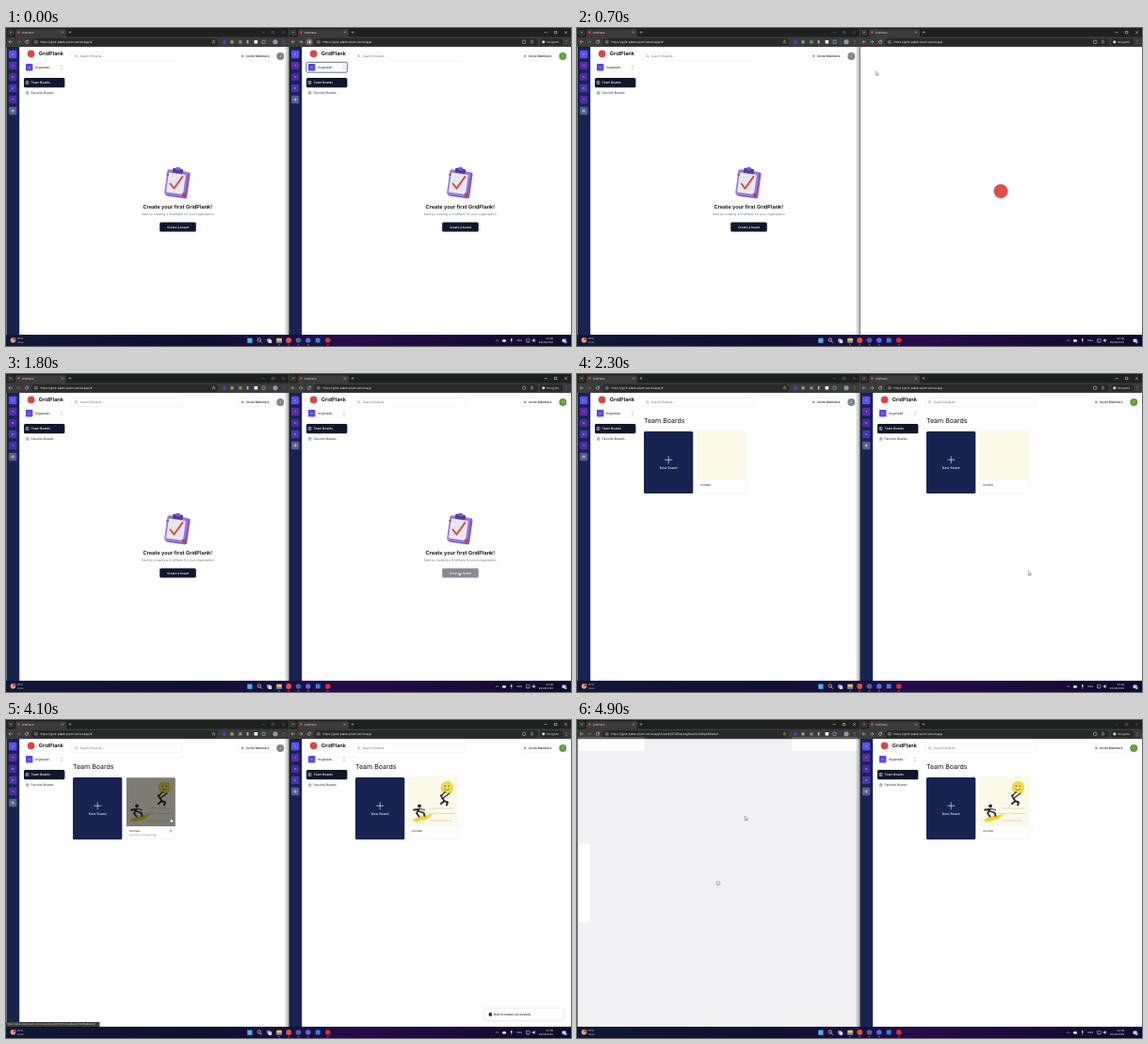
Recreate the animation shown at these times as an HTML page. Size 600 by 338 pixels, loop 5000 ms.

```html
<!DOCTYPE html>
<html lang="en">
<head>
<meta charset="utf-8">
<title>GridPlank</title>
<style>
html, body { margin: 0; height: 100%; overflow: hidden; background: #fff; }
svg { display: block; width: 100vw; height: 100vh; }
text { font-family: Inter, sans-serif; text-rendering: geometricPrecision; white-space: pre; }
</style>
</head>
<body>
<svg id="stage" viewBox="0 0 600 338" preserveAspectRatio="none"></svg>
<script>
const LOOP = 5000, STEP = 100;
const NAME = 'GridPlank', HOST = 'https://grid-plank-plum.vercel.app';
const BOARD_URL = HOST + '/board/j57451dvkxg9exp5c5d9pk86wdyf';
const NAVY = '#172350', INK = '#0f172a', GREY = '#71717a', LINE = '#e4e4e7';

const rect = (x, y, w, h, fill, r = 0, more = '') =>
  `<rect x="${x}" y="${y}" width="${w}" height="${h}" rx="${r}" fill="${fill}" ${more}/>`;
const circle = (x, y, r, fill, more = '') =>
  `<circle cx="${x}" cy="${y}" r="${r}" fill="${fill}" ${more}/>`;
const path = (d, stroke, w = .5, fill = 'none') =>
  `<path d="${d}" stroke="${stroke}" stroke-width="${w}" fill="${fill}" stroke-linecap="round" stroke-linejoin="round"/>`;
// y is the vertical middle of the line
const text = (x, y, size, str, fill = INK, weight = 400, anchor = 'start') =>
  `<text x="${x}" y="${y + size * .36}" font-size="${size}" fill="${fill}" font-weight="${weight}" text-anchor="${anchor}">${str}</text>`;
const group = (id, body, more = '') => `<g id="${id}" ${more}>${body}</g>`;
const border = (color, w = .35) => `stroke="${color}" stroke-width="${w}"`;
const plus = (x, y, r, color, w) => path(`M${x - r} ${y}h${2 * r}M${x} ${y - r}v${2 * r}`, color, w);
const star = (x, y, r, color) => {
  let d = '';
  for (let i = 0; i < 10; i++) {
    const a = i * Math.PI / 5, k = i % 2 ? r * .45 : r;
    d += (i ? 'L' : 'M') + (x + k * Math.sin(a)) + ' ' + (y - k * Math.cos(a));
  }
  return path(d + 'Z', color, .35);
};

function browserBar(id, right) {
  const c = '#d0d0d0';
  let s = rect(0, 0, 300, 11, '#1f2020') + rect(1.5, 1.5, 7, 6.5, '#343535', 1.5) +
    path('M4 4.2l1 1l1-1', c, .5) +
    `<path d="M8.5 10Q10 10 10 8V3Q10 1.2 12 1.2H62Q64 1.2 64 3V8Q64 10 65.5 10Z" fill="#3b3b3b"/>` +
    circle(13.3, 4.6, 1.3, '#e0433f') + text(16.7, 4.7, 2.8, NAME, '#e2e2e2') +
    path('M59 3.7l1.8 1.8m0-1.8l-1.8 1.8', c, .4) + plus(68, 4.5, 1.2, c, .4) +
    group(id + 'Controls', path('M272 4.7h2.2M282.7 3.6h2.2v2.2h-2.2zM293.4 3.6l2.2 2.2m0-2.2l-2.2 2.2', '#fff', .45)) +
    rect(0, 9.5, 300, 10.6, '#3b3b3b');
  if (right) s += group('reloadHover', circle(22, 14.8, 3.6, '#676767'));
  s += path('M6.6 14.8h-3.4m1.4-1.4l-1.4 1.4l1.4 1.4', c) +
    path('M11.4 14.8h3.4m-1.4-1.4l1.4 1.4l-1.4 1.4', right ? c : '#7b7b7b') +
    path('M23.4 14a1.6 1.6 0 1 0 .1 1.4M23.5 13v1.2h-1.2', c) +
    rect(27, 11, right ? 238 : 198, 7.7, '#282828', 3.8) + circle(31.8, 14.8, 2.6, '#3d3d3d') +
    path('M30.6 14.1h2.4M30.6 15.6h2.4', c, .4) +
    group(id + 'Url', text(36.5, 14.9, 3.2, right ? HOST : HOST + '/#', '#e8e8e8')) +
    star(right ? 258.5 : 220.5, 14.8, 1.8, c);
  if (right) s += rect(248.6, 13.2, 3.2, 3.2, 'none', .5, border(c, .5)) +
    rect(267, 11.2, 24.5, 7.3, '#282828', 3.6) + circle(270.8, 14.8, 1.6, c) +
    text(274, 14.9, 3, 'Incognito', '#e8e8e8');
  else s += circle(232, 15, 2, '#5b35c9') + rect(238.4, 13.2, 3.2, 3.2, '#9a9a9a', .6) +
    rect(247.2, 13.2, 3.4, 3.4, '#6f9a52', .6) + rect(255.8, 13, 1.6, 3.6, '#bdbdbd', .4) +
    rect(263.6, 13, 3.6, 3.6, '#f2f2f2', .5) + rect(272, 13.2, 3.2, 3.2, 'none', .5, border(c, .5)) +
    path('M279.3 13v3.8', '#666', .3) + circle(286, 14.8, 2.6, '#8b9aa6');
  return s + [13.3, 14.8, 16.3].map(y => circle(295, y, .4, c)).join('');
}

function clipboard() {
  return `<g transform="rotate(8 182 166)">` + rect(171, 152, 23, 28, '#7d5bc4', 2) +
    rect(169.5, 151.5, 22, 27, '#9b7be0', 2) + rect(171.3, 155, 18, 21, '#eceaf2', .8) +
    path('M173 159h14M173 163h14M173 167h14M173 171h14M176 156v19M180 156v19M184 156v19', '#cfcad9', .3) +
    rect(175, 149.5, 11, 5, '#5a3a92', 1.2) + rect(178, 148, 5, 3.5, '#7d5bc4', 1.2) + '</g>' +
    path('M174.5 165.5l4 5l9-12.5', '#d64a3c', 2) +
    circle(188.8, 177.3, 2.1, '#c43d50') + circle(171.6, 156, 1.2, '#53545c') + circle(171.6, 156, .5, '#e9b949');
}

function emptyPage(id) {
  return group(id + 'Empty', clipboard() +
    text(182.3, 190.2, 5.6, `Create your first ${NAME}!`, '#09090b', 600, 'middle') +
    text(182.3, 198.3, 3.27, `Start by creating a ${NAME} for your organization`, GREY, 400, 'middle') +
    group(id + 'Create', rect(163.2, 206.4, 38.6, 10, INK, 1.5) +
      text(182.5, 211.5, 3.27, 'Create a board', '#fff', 500, 'middle')));
}

function picture() {
  const dark = '#2c2a3c', gold = '#f4cf27';
  const lines = [[151, 94, 23], [143, 99.5, 14], [160, 99.5, 16], [151, 107, 22]];
  return lines.map(([x, y, w]) => path(`M${x} ${y}h${w}`, '#d9d9d3', 1)).join('') +
    circle(168.3, 71.8, 6.6, gold) + circle(168.3, 71.8, 5, '#f9df55') +
    circle(166.3, 70.3, .7, dark) + circle(170.2, 70.3, .7, dark) +
    path('M165.6 73.2q2.7 2.8 5.3 0', dark, .6) +
    path('M162.3 80.5l4-4M164 83l7-5', dark, 1.2) + circle(162.2, 80.5, 1.3, dark) +
    path('M163 82.5l2.5 3.5l-3.5 3M165 86l4 1.5l-1 3', dark, 2) +
    path('M132 106.5l6-3.5l14.5-2.5l-5 4.5l-12 3z', '#e6bb1a', .3, gold) +
    circle(139, 91.3, 1.9, dark) + path('M139 94.5l-3 4.5l2.5 3.5M138.5 97l5 1.5l1 3.5M138 95l-5 .5', dark, 1.8) +
    path('M140 94.5l4.5 1', dark, 1);
}

function boardsPage(id) {
  let s = text(71, 49.2, 7, 'Team Boards', '#09090b') +
    rect(71, 61, 52.3, 66, NAVY, 1.5) + plus(97.2, 91.2, 3.6, '#fff', .6) +
    text(97.2, 99.8, 3.6, 'New Board', '#fff', 400, 'middle') +
    rect(127.7, 61, 52.3, 66, '#fff', 1.5, border(LINE)) +
    `<path d="M127.9 113V62.5q0-1.3 1.3-1.3H178.5q1.3 0 1.3 1.3V113z" fill="#fcfae6"/>` +
    group(id + 'Picture', picture());
  if (id == 'l') s += group('hover',
    `<path d="M127.9 113V62.5q0-1.3 1.3-1.3H178.5q1.3 0 1.3 1.3V113z" fill="#000" opacity=".5"/>` +
    text(131, 122.3, 2.56, 'arlo fenn, 2 minutes ago', GREY) + star(175, 117.8, 1.6, GREY));
  return group(id + 'Boards', s + text(131, 118, 3.03, 'Untitled', '#27272a'));
}

function app(id, right) {
  const tints = ['#5b50ee', '#5a2aa8', '#4b2a9c', '#4636ae', '#4a2f9f'].slice(0, right ? 4 : 5);
  let s = rect(.8, 20, 13.4, 306, NAVY);
  tints.forEach((c, i) => {
    s += rect(3, 23.8 + 12 * i, 8.4, 8.4, c, 1.2) +
      text(7.2, 28 + 12 * i, 2.8, 'OTNDT'[i], '#c9c4f5', 500, 'middle');
  });
  const y = 28 + 12 * tints.length;
  s += rect(3, y - 4.2, 8.4, 8.4, '#56608a', 1.2) + plus(7.2, y, 1.5, '#fff', .5) +
    circle(26.6, 27.4, 3.8, '#e0433f') + text(34.7, 27.3, 5.6, NAME, '#09090b', 600);
  if (right) s += group('focus', rect(318.8 - 300, 36.4, 43.6, 10.8, '#fff', 1.5, border('#30385c', .7)));
  s += rect(21, 38, 7.4, 7.4, '#5b45e8', 1) + text(24.7, 41.8, 2.8, 'O', '#d9d5ff', 500, 'middle') +
    text(31, 41.8, 3.1, 'Organizati...', '#27272a', 500) +
    path('M58.2 40.8l.9-.9l.9.9M58.2 42.9l.9.9l.9-.9', GREY, .4) +
    rect(19, 53, 43.4, 10.2, INK, 1.5) +
    path('M21.3 56.6h2.8v2.8h-2.8zM22.7 56.6v2.8M21.3 58h1.4', '#fff', .4) +
    text(26.6, 58, 3.27, 'Team Boards', '#fff', 500) +
    star(22.7, 69.2, 1.7, '#27272a') + text(26.6, 69.2, 3.27, 'Favorite Boards', '#27272a') +
    rect(69.5, 25.5, 117.5, 8.8, '#fff', 1.4, border(LINE)) +
    circle(74.4, 29.6, 1.2, 'none', border(GREY, .4)) + path('M75.3 30.5l.9.9', GREY, .4) +
    text(78.8, 30, 3.27, 'Search Boards...', GREY) +
    rect(246, 25.5, 38.2, 8.8, '#fff', 1.4, border(LINE)) + plus(251.2, 29.9, 1, INK, .45) +
    text(255.3, 30, 3.27, 'Invite Members', INK, 500) +
    circle(291.3, 29.9, 4, right ? '#5f9f3a' : '#7f858c') +
    text(291.3, 30, 3, right ? 'T' : 'J', '#e8f0e4', 500, 'middle');
  return group(id + 'App', s + emptyPage(id) + boardsPage(id));
}

function boardLoading() {
  const panel = (x, y, w, h) => rect(x, y, w, h, '#fff', 1, border('#e2e2e4', .4));
  return group('loading', rect(.5, 20, 299.5, 306, '#f1f0f2') + panel(1.4, 19, 70.6, 14.4) +
    panel(228, 19, 71, 14.4) + panel(1.8, 131, 12.4, 84.5) + rect(.5, 19.2, 299.5, 1, '#3b3b3b') +
    group('spinner', path('M151.2 171.9a1.9 1.9 0 1 0 .7 1.5', '#71717a', .6)));
}

function taskbar() {
  const w = '#e6e6ee';
  return rect(0, 326, 600, 12, 'url(#bar)') +
    circle(7.5, 331.8, 2.8, '#d9a38a') + circle(9, 330.3, 1.6, '#d8382f') +
    text(12, 330.2, 2.7, '31°C', w) + text(12, 334.3, 2.7, 'Haze', '#b5b5c4') +
    rect(256.3, 329.6, 5.2, 5.2, '#46b4f0') +
    circle(268.8, 331.5, 1.7, 'none', border(w, .7)) + path('M270.1 332.9l1.5 1.5', w, .7) +
    rect(277, 330, 3.6, 3.6, '#8d8d98', .4) + rect(278.6, 331.3, 3.6, 3.6, '#dcdce4', .4) +
    rect(287.3, 329.8, 5.6, 4.6, '#f3c644', .5) + rect(287.3, 332.6, 5.6, 1.9, '#3f92dc', .3) +
    circle(300.2, 332, 2.9, '#e2503f') + circle(310.5, 332, 2.8, '#3a6b9c') +
    circle(320.8, 332, 2.7, '#5865f2') + rect(328.8, 329.6, 4.8, 4.8, '#2a8ad4') +
    circle(341.8, 332, 2.8, '#d5302c') +
    [290, 300, 310.5, 320.8, 341.8].map(x => rect(x - 1, 336.6, 2, .6, '#9a9ab0', .3)).join('') +
    path('M520.5 332.6l1.2-1.2l1.2 1.2', w, .5) +
    `<ellipse cx="529" cy="332.4" rx="2.1" ry="1.3" fill="${w}"/>` +
    rect(536.1, 330, 1.4, 2.9, w, .7) + path('M536.8 333.5v1', w, .4) +
    text(545.3, 332.2, 2.7, 'ENG', w, 400, 'middle') +
    rect(552.7, 330.8, 3.4, 2.4, 'none', 0, border(w, .45)) + path('M553.6 334.2h1.6', w, .4) +
    `<path d="M558.8 331.4h1l1.4-1.3v4l-1.4-1.3h-1z" fill="${w}"/>` + path('M562 331q.7 1.1 0 2.2', w, .4) +
    text(581, 330.3, 2.7, '22:08', w, 400, 'end') + text(581, 334.4, 2.7, '20/05/2024', w, 400, 'end') +
    rect(590.6, 330.5, 4, 3.6, '#cfd6ea', .8) + circle(594.2, 333.8, 1.5, '#66b9ee');
}

function pointers() {
  return group('cursor',
    group('arrow', path('M0 0v4l1-.9l.7 1.5l.7-.3l-.7-1.5h1.3z', '#222', .35, '#fff')) +
    group('hand', path('M-.5-.2q.5-.6 1 0v1.6l1.6.4q.5.2.4.8l-.4 1.8h-2.4l-1.2-1.9q0-.6.6-.3l.4.4z', '#222', .35, '#fff')));
}

const stage = document.getElementById('stage');
stage.innerHTML = `<defs>
  <linearGradient id="bar"><stop offset="0" stop-color="#101737"/><stop offset=".35" stop-color="#0e1030"/>
  <stop offset=".6" stop-color="#260b4c"/><stop offset=".8" stop-color="#1c0a3a"/><stop offset="1" stop-color="#0e0b28"/></linearGradient>
  <linearGradient id="edge"><stop offset="0" stop-color="#000" stop-opacity="0"/><stop offset="1" stop-color="#000" stop-opacity=".3"/></linearGradient></defs>` +
  rect(0, 0, 600, 338, '#fff') +
  group('left', browserBar('l', false) + app('l', false) + boardLoading() +
    group('status', rect(0, 321, 99.5, 5, '#3b3b3b', .6) + text(1.2, 323.5, 2.65, BOARD_URL, '#d8d8d8')) +
    rect(0, 0, .6, 326, '#333')) +
  group('right', browserBar('r', true) + app('r', true) +
    group('splash', circle(150, 173.5, 7.5, '#e0433f')) +
    group('toast', rect(208, 306.6, 84, 12.6, '#fff', 1.8, border('#e2e2e4') +
      ' style="filter:drop-shadow(0 .8px 1.2px #0002)"') +
      circle(214.4, 313, 1.9, '#171717') + path('M213.6 313.1l.6.6l1.1-1.3', '#fff', .4) +
      text(218, 313, 3.03, 'Board created successfully', '#171717', 500)) +
    rect(0, 0, .7, 326, '#4a4a4a'), 'transform="translate(300)"') +
  rect(295.5, 20, 4.5, 306, 'url(#edge)') + taskbar() + pointers();

const el = {};
stage.querySelectorAll('g[id]').forEach(g => el[g.id] = g);
const show = (id, on) => el[id].style.display = on ? '' : 'none';
const fade = (id, v) => el[id].setAttribute('opacity', v);
const move = (id, v) => el[id].setAttribute('transform', v);
const ramp = (t, a, b) => Math.min(1, Math.max(0, (t - a) / (b - a)));
const between = (t, a, b) => t >= a && t < b;

// time, x, y of the pointer tip
const route = [[0, 321.5, 13], [200, 321.5, 13], [500, 320.6, 52.5], [800, 316, 44], [1100, 311, 29],
  [1300, 311, 29], [1700, 481, 210], [2300, 479.3, 210], [2600, 476, 205], [3200, 407.5, 143.8],
  [3800, 177, 105], [4100, 175.2, 104.5], [4500, 175.2, 104.5], [4900, 178.3, 102.5], [5000, 178.3, 102.5]];

function pointerAt(t) {
  const i = route.findIndex(k => k[0] > t), [a, x, y] = route[i - 1], [b, u, v] = route[i];
  const p = ramp(t, a, b), e = p * p * (3 - 2 * p);
  return [x + (u - x) * e, y + (v - y) * e];
}

const urlText = el.lUrl.firstChild;
function draw(t) {
  const opened = t >= 4500, created = t >= 2100, reloading = between(t, 300, 900);
  show('reloadHover', t < 300);
  show('focus', t < 300);
  show('rApp', !reloading);
  show('splash', reloading);
  fade('splash', .75 + .25 * Math.cos((t - 500) / 1000 * Math.PI));
  for (const id of ['l', 'r']) {
    show(id + 'Empty', !created);
    show(id + 'Boards', created);
    show(id + 'Picture', t >= 2600);
  }
  fade('rCreate', between(t, 1800, 2100) ? .5 : between(t, 1600, 1800) ? .9 : 1);
  const over = between(t, 3800, 4500);
  show('hover', over);
  show('status', over);
  show('lApp', !opened);
  show('loading', opened);
  urlText.textContent = opened ? BOARD_URL : HOST + '/#';
  fade('lControls', opened ? 1 : .4);
  fade('rControls', opened ? .4 : 1);
  move('spinner', `rotate(${t * .36} 150 173.4)`);

  const shown = ramp(t, 2400, 2700) * (1 - ramp(t, 4500, 4800));
  fade('toast', shown);
  move('toast', `translate(0 ${14 * (1 - shown)})`);

  const hand = between(t, 1000, 1300) || between(t, 1600, 2100) || over;
  show('hand', hand);
  show('arrow', !hand);
  move('cursor', `translate(${pointerAt(t)})`);
}

function tick() {
  draw(Math.floor(performance.now() % LOOP / STEP) * STEP);
  requestAnimationFrame(tick);
}
tick();
</script>
</body>
</html>
```
